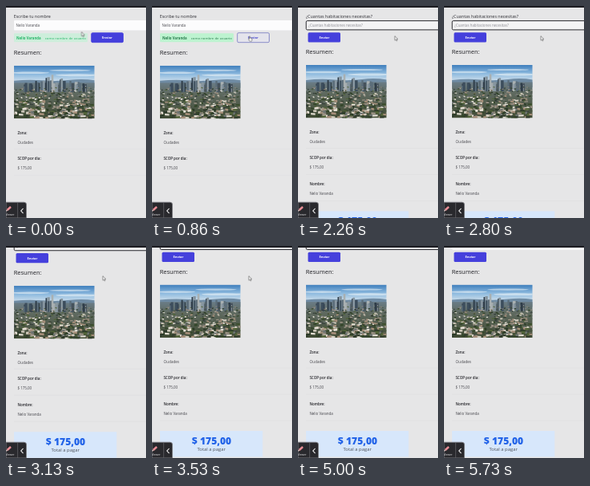
An HTML page that plays this animation: 175x266 px, repeating every 5.8 s.

```html
<!DOCTYPE html>
<html lang="es">
<head>
<meta charset="utf-8">
<title>Resumen</title>
<style>
  html, body { margin: 0; width: 100%; height: 100%; overflow: hidden; background: #e6e6e7; }
  svg { display: block; width: 100vw; height: 100vh; font-family: "Open Sans", "Noto Sans", sans-serif; font-size: 4.5px; }
  text { fill: #46464c; }
  .q { font-size: 5.4px; fill: #2d2d33; }
  .h { font-size: 7.5px; fill: #1f1f24; }
  .k { font-weight: 600; fill: #26262b; }
  .btn { font-size: 4.1px; font-weight: 700; fill: #fff; text-anchor: middle; }
  .hint { font-size: 4.4px; fill: #8d8d94; }
  .sum { font-size: 12.1px; font-weight: 800; fill: #2263e8; text-anchor: middle; }
  .tot { font-size: 5.9px; text-anchor: middle; fill: #4a4f58; }

  .first, .second, .scroll, .note, .noteText, .face, .label, .arrow, .hand, .pointer, .ring, .caret, .field {
    animation: 5.8s linear infinite;
  }
  .first { animation-name: first; animation-timing-function: step-end; }
  .second { animation-name: second; animation-timing-function: step-end; }
  .scroll { animation-name: scroll; }
  .note { animation-name: note; }
  .noteText { animation-name: noteText; font-size: 4.35px; }
  .face { animation-name: face; }
  .label { animation-name: label; }
  .pointer { animation-name: pointer; }
  .arrow { animation-name: arrow; animation-timing-function: step-end; }
  .hand { animation-name: hand; animation-timing-function: step-end; }
  .ring { animation-name: ring; transform-origin: 121.7px 38.5px; }
  .caret { animation-name: caret; animation-timing-function: step-end; }
  .field { animation-name: field; animation-timing-function: step-end; }

  /* 1530 ms = 26.38%, 5730 ms = 98.79% */
  @keyframes first { 0% { visibility: visible } 26.38%, 100% { visibility: hidden } }
  @keyframes second { 0% { visibility: hidden } 26.38%, 100% { visibility: visible } }
  @keyframes scroll {
    0%, 49.3% { transform: none; animation-timing-function: cubic-bezier(.3, 0, .3, 1) }
    55.5%, 100% { transform: translateY(-25.4px) }
  }
  @keyframes field {
    0% { fill: #f3f3f4; stroke: #28282d }
    98.79%, 100% { fill: #fcfcfd; stroke: #fcfcfd }
  }
  @keyframes note { 0%, 1% { fill: #cdeedb } 8%, 100% { fill: #bdf3d0 } }
  @keyframes noteText { 0%, 1% { fill: #25b567 } 8%, 100% { fill: #2a7d4f } }
  @keyframes face { 0%, 7% { fill: #443fdc; stroke: #443fdc } 9.2%, 100% { fill: #e4e4ec; stroke: #7377bf } }
  @keyframes label { 0%, 7% { fill: #fff } 9.2%, 100% { fill: #4a4bcc } }
  @keyframes pointer {
    0%, 1% { transform: translate(94.5px, 32.5px); animation-timing-function: ease-in-out }
    9%, 100% { transform: translate(121px, 37.6px) }
  }
  @keyframes arrow {
    0% { visibility: visible } 6.5% { visibility: hidden }
    26.38% { visibility: visible } 69%, 100% { visibility: hidden }
  }
  @keyframes hand { 0% { visibility: hidden } 6.5% { visibility: visible } 26.38%, 100% { visibility: hidden } }
  @keyframes ring {
    0%, 26.3% { transform: scale(.2); opacity: 0 }
    26.4% { transform: scale(.2); opacity: 1; animation-timing-function: ease-out }
    30%, 32.5% { transform: none; opacity: 1 }
    35.5%, 100% { transform: scale(1.05); opacity: 0 }
  }
  @keyframes caret {
    0% { opacity: 0 } 26.38% { opacity: 1 } 36% { opacity: 0 }
    40% { opacity: 1 } 47.5%, 100% { opacity: 0 }
  }
</style>
</head>
<body>
<svg viewBox="0 0 175 266" preserveAspectRatio="none">
  <defs>
    <linearGradient id="sky" x2="0" y2="1">
      <stop offset="0" stop-color="#3f7fbd"/>
      <stop offset=".5" stop-color="#8fbbdf"/>
      <stop offset="1" stop-color="#dbe6ee"/>
    </linearGradient>
    <linearGradient id="land" x2="0" y2="1">
      <stop offset="0" stop-color="#6a7c86"/>
      <stop offset=".3" stop-color="#5f6a60"/>
      <stop offset="1" stop-color="#3f4a33"/>
    </linearGradient>
    <clipPath id="frame"><rect width="100.5" height="66.5"/></clipPath>
    <g id="summary">
      <text class="h" x="9.7" y="60">Resumen:</text>
      <g transform="translate(10 74)" clip-path="url(#frame)">
        <rect width="101" height="22" fill="url(#sky)"/>
        <g fill="#f3f7fa" opacity=".55">
          <ellipse cx="20" cy="9" rx="24" ry="1.3"/>
          <ellipse cx="70" cy="6" rx="26" ry="1.1"/>
          <ellipse cx="80" cy="12" rx="28" ry="1.5"/>
        </g>
        <path d="M0 19 Q18 17 36 18.5 T70 18 T101 18.5 V28 H0Z" fill="#6f8ba3"/>
        <rect y="21.5" width="101" height="45" fill="url(#land)"/>
        <g id="city"></g>
      </g>
      <path d="M10 178.5H175M10 211.5H175" stroke="#dededf" stroke-width=".6"/>
      <text class="k" x="14.4" y="160">Zona:</text>
      <text x="14.4" y="172">Ciudades</text>
      <text class="k" x="14.4" y="192.3">SCOP por dia:</text>
      <text x="14.4" y="204.3">$ 175,00</text>
    </g>
  </defs>

  <rect width="175" height="266" fill="#e6e6e7"/>

  <g class="first">
    <text class="q" x="9.8" y="14.7">Escribe tu nombre</text>
    <rect x="10" y="18" width="170" height="12.5" rx="1" fill="#fcfcfd"/>
    <text x="12.5" y="25.7">Nelio Varanda</text>
    <rect class="note" x="10" y="34.3" width="92" height="11" rx="1"/>
    <text class="noteText" x="13" y="41.5"><tspan font-weight="700">Nelio Varanda</tspan><tspan x="48.7">como nombre de usuario</tspan></text>
    <rect class="face" x="106.7" y="33.7" width="39.8" height="12" rx="1.5" stroke-width=".8"/>
    <text class="btn label" x="126.5" y="41.3">Enviar</text>
    <use href="#summary" y=".8"/>
  </g>

  <g class="second">
    <g class="scroll">
      <text class="q" x="9.8" y="14.7">¿Cuantas habitaciones necesitas?</text>
      <rect class="field" x="10.2" y="18.6" width="170" height="11.3" rx="1.5" stroke-width="1"/>
      <text class="hint" x="13" y="25.8">¿Cuantas habitaciones necesitas?</text>
      <path class="caret" d="M12.7 21.5V27.5" stroke="#222" stroke-width=".6"/>
      <rect x="12.5" y="33.2" width="40.5" height="12.3" rx="1.5" fill="#4540dc"/>
      <text class="btn" x="32.9" y="40.8">Enviar</text>
      <use href="#summary"/>
      <path d="M10 244.5H175" stroke="#dededf" stroke-width=".6"/>
      <text class="k" x="14.4" y="225">Nombre:</text>
      <text x="14.4" y="237">Nelio Varanda</text>
      <rect x="10" y="257.4" width="128.3" height="32.5" fill="#d7e7fb"/>
      <text class="sum" x="74.5" y="274">$ 175,00</text>
      <text class="tot" x="74.2" y="282.4">Total a pagar</text>
    </g>
  </g>

  <circle class="ring" cx="121.7" cy="38.5" r="8.8" fill="#e8b9b9" fill-opacity=".18" stroke="#d9665f" stroke-width=".9"/>
  <g class="pointer" stroke="#333" stroke-width=".5" stroke-linejoin="round" fill="#fff">
    <path class="arrow" d="M0 0V5.4L1.2 4.3 2.1 6.1 3 5.7 2.2 4H3.8Z"/>
    <path class="hand" d="M.6 .6Q1.2 0 1.6 .7V2.6L4 3.2V5.2L3.4 6.6H1.3L-.4 4.2 .6 3.9Z"/>
  </g>

  <rect width="175" height="2" fill="#1d1d22"/>
  <g>
    <path d="M0 246.2H22.5Q25.5 246.2 25.5 249V266H0Z" fill="#29292d" stroke="#85858a" stroke-width=".8"/>
    <path d="M14.6 247V266" stroke="#66666b" stroke-width=".7"/>
    <path d="M21.5 254L18.7 257.1 21.5 260.2" fill="none" stroke="#eee" stroke-width="1.1"/>
    <path d="M1.6 256L6 252" stroke="#e88d96" stroke-width="2.5"/>
    <path d="M.3 257.2L1.6 256" stroke="#f3d9d6" stroke-width="1.2"/>
    <text x="-.6" y="263.2" font-size="3.5" style="fill:#e6e6e8">Viewer</text>
  </g>
</svg>
<script>
  const city = document.getElementById("city");
  let seed = 11;
  const rnd = () => (seed = (seed * 16807) % 2147483647) / 2147483647;
  const pick = list => list[Math.floor(rnd() * list.length)];

  function block(x, y, w, h, fill, skew = 0) {
    const p = document.createElementNS("http://www.w3.org/2000/svg", "path");
    p.setAttribute("d", `M${x} ${y}l${w} ${skew}v${h}l${-w} ${-skew}z`);
    p.setAttribute("fill", fill);
    city.append(p);
  }

  // skyline, tallest around the centre
  const glass = ["#3c4d5c", "#5b6d7a", "#8796a0", "#2f3d49", "#a9b0b2", "#46525c"];
  for (let i = 0; i < 46; i++) {
    const x = 12 + rnd() * 80;
    const h = 4 + rnd() * 5 + 10 * Math.exp(-(((x - 47) / 20) ** 2)) * rnd();
    block(x, 30 - h, 1.6 + rnd() * 2.4, h + 3, pick(glass));
  }
  // houses and trees, larger towards the viewer
  const town = ["#d3cdbf", "#e6e1d6", "#9a9184", "#34462a", "#2b3a25", "#516338", "#6e7472", "#39423f", "#a58f7a", "#2f3a2c"];
  for (let i = 0; i < 420; i++) {
    const t = i / 420;
    const s = 1.3 + t * 3;
    block(rnd() * 104 - 3, 27 + t * 38, s * (.7 + rnd()), s * (.4 + rnd() * .5), pick(town), s * (rnd() - .4) * .6);
  }
</script>
</body>
</html>
```
